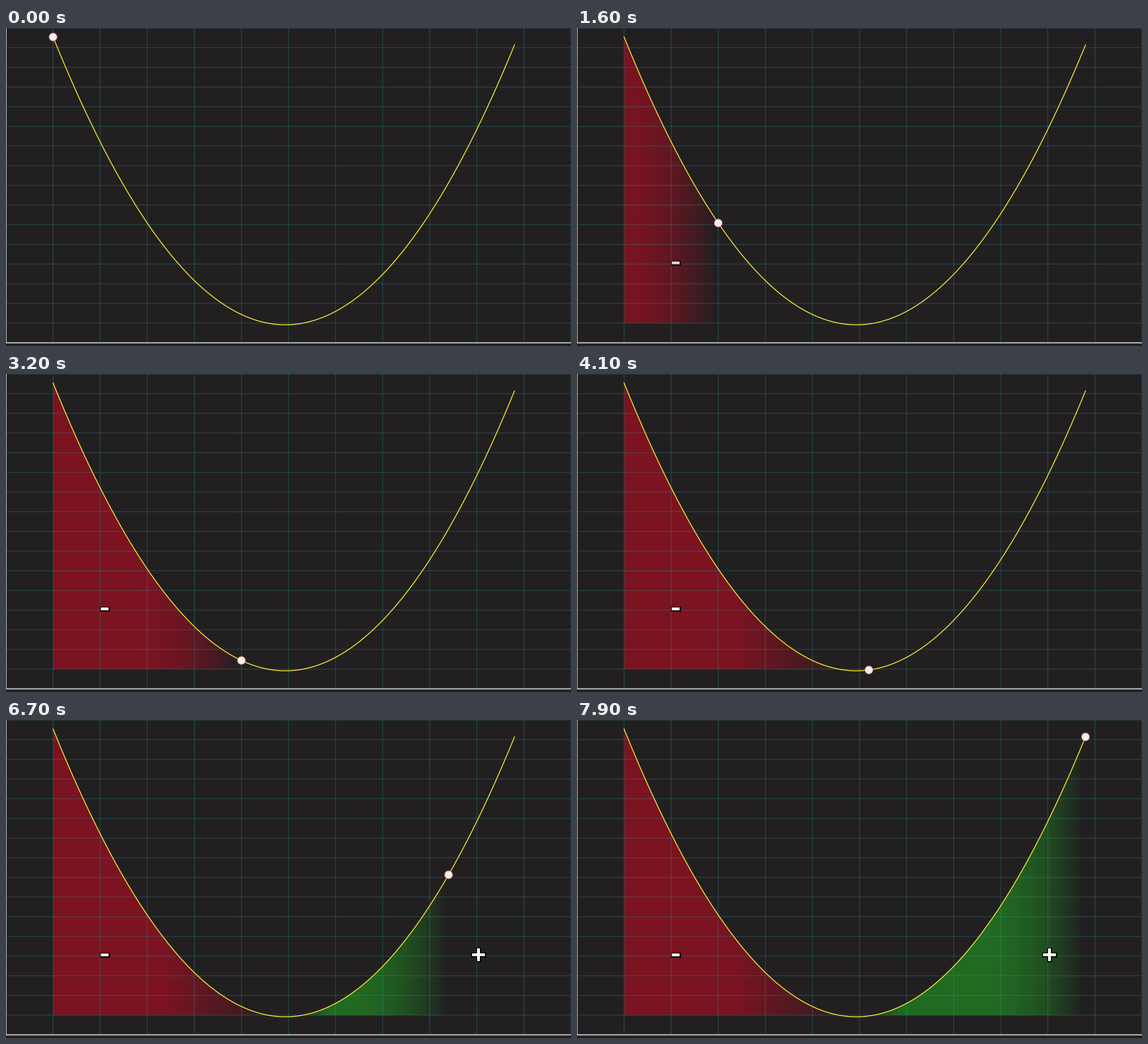
Recreate the animation shown at these times as a matplotlib script. Size 800 by 450 pixels, loop 8 s.

```python
import math

import matplotlib.pyplot as plt
import numpy as np
from matplotlib.animation import FuncAnimation
from matplotlib.patches import Circle, Polygon, Rectangle

W, H, DPI = 800, 450, 100
PX = 72 / DPI                      # one pixel in points
FRAMES, INTERVAL = 80, 100
STEP = 20 / 3                      # width of one strip
FIRST, LAST = 10, 108              # strips covered by the curve
BASE = 417.6
ROW = 27.84
RED = (197 / 255, 10 / 255, 34 / 255)
GREEN = (33 / 255, 169 / 255, 33 / 255)
FILL = 0.55
FADE = 22                          # steps until a strip is fully shown

fig = plt.figure(figsize=(W / DPI, H / DPI), dpi=DPI, facecolor="#221f21")
ax = fig.add_axes([0, 0, 1, 1])
ax.axis("off")


def curve(x):
    return 420 - 0.003764 * (x - 395.6) ** 2


def ramp(v, start, end):
    return np.clip((v - start) / (end - start), 0, 1)


# translucent grid over the fill, and the axes
grid = dict(color="#2aafac", alpha=0.3, lw=PX, snap=False, zorder=4)
for i in range(1, 13):
    ax.plot([i * 10 * STEP] * 2, [0, 445], **grid)
for i in range(16):
    y = BASE - i * ROW
    ax.plot([0, W], [y, y], **grid)
ax.add_patch(Rectangle((0, 0), 1, 446, fc="#b4b4b4", lw=0, zorder=4))
ax.add_patch(Rectangle((0, 444.7), W, 1.6, fc="#d0d0d0", lw=0,
                       snap=False, zorder=4))

# area between curve and baseline, one colour cell per strip
x0, x1 = FIRST * STEP, LAST * STEP
xs = np.linspace(x0, x1, 400)
ids = np.arange(FIRST, LAST)
mid = (ids + 0.5) * STEP
left = mid < 395
limit = np.where(left, ramp(mid, 395, 225), ramp(mid, 395, 460))
cells = np.zeros((1, len(ids), 4))
cells[0, :, :3] = np.where(left[:, None], RED, GREEN)
area = ax.imshow(cells, extent=(x0, x1, BASE, 0), aspect="auto",
                 interpolation="nearest", zorder=3)
edge = np.column_stack([xs, np.minimum(curve(xs), BASE)])
outline = np.vstack([[x0, BASE], edge, [x1, BASE]])
clip = Polygon(outline, transform=ax.transData)
area.set_clip_path(clip)

ax.plot(xs, curve(xs), color="#fff235", lw=1.2 * PX, zorder=5)
ball = Circle((x0, curve(x0)), 5.7, fc="white", ec="#c85a5a",
              lw=0.8 * PX, alpha=0.92, zorder=6)
ax.add_patch(ball)


def sign(cx, cy, bars):
    """White bars with a black rim, heavier at lower right."""
    parts = []
    for color, z, lo, hi in (("black", 7, 1, 1.8), ("white", 8, 0, 0)):
        for w, h in bars:
            r = Rectangle((cx - w / 2 - lo, cy - h / 2 - lo),
                          w + lo + hi, h + lo + hi, fc=color, lw=0,
                          snap=False, zorder=z)
            parts.append(ax.add_patch(r))
    return parts


minus = sign(139.8, 332.4, [(11, 4)])
plus = sign(669, 332.2, [(18, 4), (4, 18)])

ax.set_xlim(0, W)
ax.set_ylim(H, 0)


def update(n):
    k = min(LAST, FIRST + math.ceil(n * 1.25))
    x = k * STEP
    ball.center = (x, curve(x))
    shown = 1 - (1 - ramp(k - 1 - ids, 0, FADE)) ** 2
    cells[0, :, 3] = FILL * np.minimum(limit, shown)
    area.set_data(cells)
    for parts, start in ((minus, 10), (plus, 59)):
        for p in parts:
            p.set_alpha(float(ramp(n, start, start + 7)))
    return [area, ball, *minus, *plus]


anim = FuncAnimation(fig, update, frames=FRAMES, interval=INTERVAL,
                     repeat=True, repeat_delay=0, blit=False)
plt.show()
```
